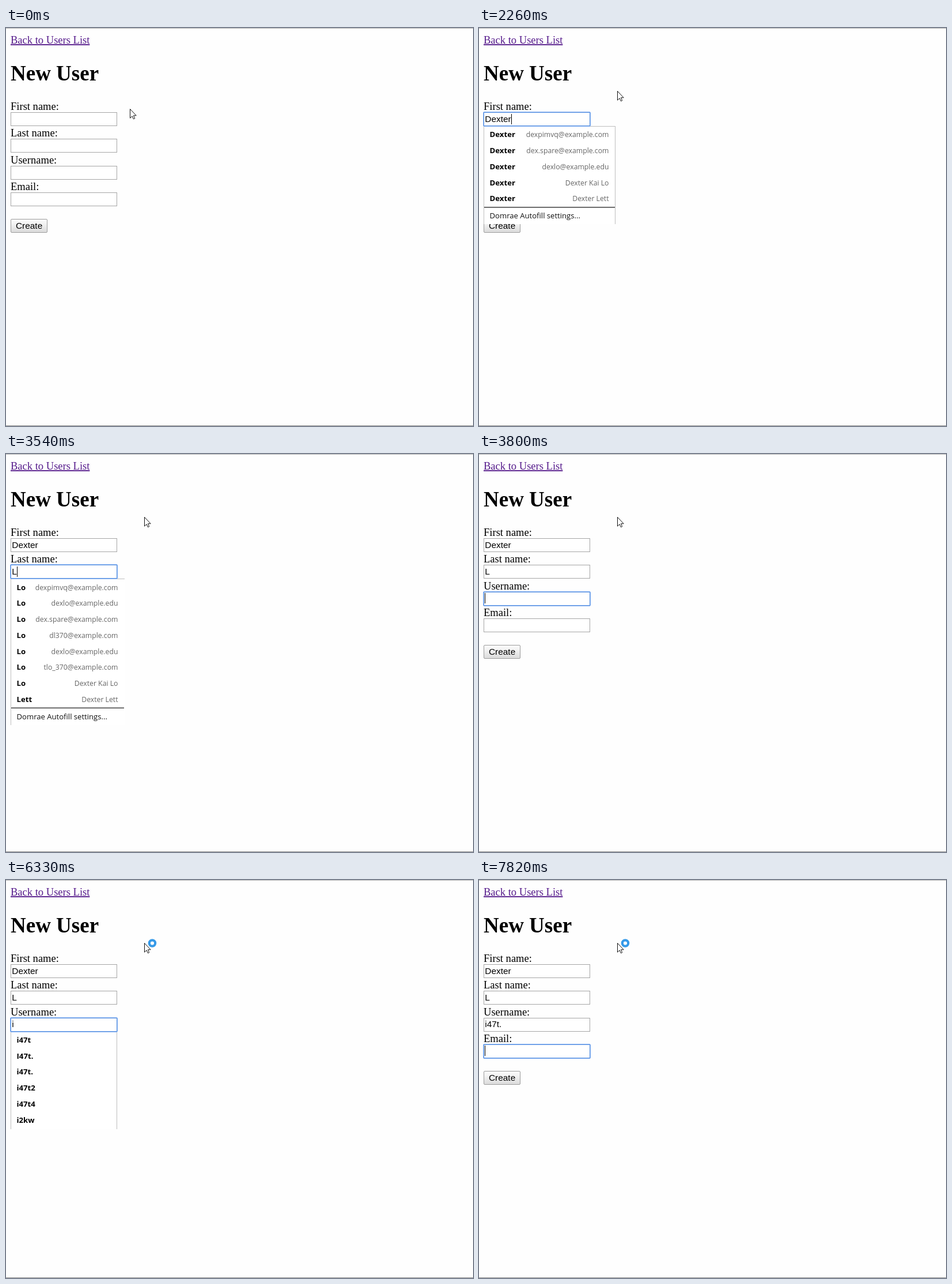
An HTML page for the animation above (8 s loop, 811 by 690 pixels).

```html
<!DOCTYPE html>
<html lang="en">
<head>
<meta charset="utf-8">
<title>New User</title>
<style>
html, body { margin: 0; width: 100%; height: 100%; overflow: hidden; background: #fefefe; }
svg { display: block; position: absolute; left: 0; top: 0; }
text { white-space: pre; }
.serif { font: 18.55px "Liberation Serif", "Times New Roman", serif; }
.link { fill: #551a8b; text-decoration: underline; }
.h1 { font: bold 37px "Liberation Serif", "Times New Roman", serif; }
.input { font: 15.4px "Liberation Sans", Arial, sans-serif; }
.item { font: bold 13.2px "Open Sans", "Noto Sans", sans-serif; }
.note { font: 12.25px "Open Sans", "Noto Sans", sans-serif; fill: #666; }
.more { font: 13.1px "Open Sans", "Noto Sans", sans-serif; fill: #111; }
</style>
</head>
<body>
<svg id="stage" width="811" height="690" viewBox="0 0 811 690">
  <defs>
    <linearGradient id="face" x1="0" y1="0" x2="0" y2="1">
      <stop offset="0" stop-color="#fbfbfb"/>
      <stop offset=".3" stop-color="#f4f4f4"/>
      <stop offset="1" stop-color="#dadada"/>
    </linearGradient>
  </defs>
  <g id="view"></g>
</svg>
<script>
const LOOP = 8000;
const PITCH = 46.25;
const ROW = 27.75;
const LABELS = ["First name:", "Last name:", "Username:", "Email:"];
const TOPS = [146, 192, 239, 285];
const TEXT_X = 10.3;
const FIRST = "Dexter";
const USER = "i47t.";

const pairs = (name, notes) => notes.map(n => [name, n]);
const MAIL = "dexpimvq@example.com", SPARE = "dex.spare@example.com";
const SCHOOL = "dexlo@example.edu", FULL = "Dexter Kai Lo", OTHER = "Dexter Lett";

const userRows = ["i47t", "I47t.", "i47t.", "i47t2", "i47t4"].map(n => [n]);
const popups = {
  first: { field: 0, top: 170, right: 237, bottom: 340, edge: true, line: true, sep: 310,
    rows: pairs(FIRST, [MAIL, SPARE, SCHOOL, FULL, OTHER]) },
  last: { field: 1, top: 216, right: 206, bottom: 470, edge: false, line: true, sep: 439.5,
    rows: [...pairs("Lo", [MAIL, SCHOOL, SPARE, "dl370@example.com", SCHOOL,
      "tlo_370@example.com", FULL]), ["Lett", OTHER]] },
  userAll: { field: 2, top: 262, right: 193, bottom: 432, edge: true, rows: [...userRows, ["i2kw"]] },
  user: { field: 2, top: 262, right: 193, bottom: 404, edge: true, rows: userRows },
  userDot: { field: 2, top: 262, right: 193, bottom: 321, edge: true, rows: userRows.slice(1, 3) }
};

// Each step changes part of the state and holds until the next one.
const steps = [
  [0, { values: ["", "", "", ""], focus: -1, caret: false, popup: "", busy: false, beam: false, x: 215.5, y: 140.5 }],
  [140, { x: 203.5, y: 143.5 }],
  [265, { beam: true, x: 186, y: 147 }],
  [390, { x: 181, y: 147 }],
  [540, { focus: 0, caret: true, x: 176 }],
  [690, { beam: false, x: 240.5, y: 109.5 }],
  [1150, { caret: false }],
  [1580, { caret: true, popup: "first", type: [0, FIRST.slice(0, 2)] }],
  [1840, { type: [0, FIRST.slice(0, 3)] }],
  [1990, { type: [0, FIRST.slice(0, 4)] }],
  [2120, { type: [0, FIRST.slice(0, 5)] }],
  [2260, { type: [0, FIRST] }],
  [2660, { focus: 1, popup: "" }],
  [3120, { caret: false }],
  [3540, { caret: true, popup: "last", type: [1, "L"] }],
  [3680, { popup: "" }],
  [3800, { focus: 2 }],
  [4270, { caret: false }],
  [4840, { caret: true }],
  [5370, { caret: false }],
  [5520, { busy: true }],
  [5800, { caret: true, popup: "userAll", type: [2, USER.slice(0, 1)] }],
  [6330, { caret: false }],
  [6480, { caret: true, popup: "user", type: [2, USER.slice(0, 2)] }],
  [6600, { type: [2, USER.slice(0, 3)] }],
  [6880, { type: [2, USER.slice(0, 4)] }],
  [7430, { type: [2, USER] }],
  [7560, { popup: "userDot" }],
  [7700, { popup: "" }],
  [7820, { focus: 3 }]
];

const ruler = document.createElement("canvas").getContext("2d");
ruler.font = '15.4px "Liberation Sans", Arial, sans-serif';

const text = (cls, x, y, s, anchor = "start") =>
  `<text class="${cls}" x="${x}" y="${y}" text-anchor="${anchor}">${s}</text>`;
const fill = (x, y, w, h, color) =>
  `<rect x="${x}" y="${y}" width="${w}" height="${h}" fill="${color}"/>`;
const box = (x, y, w, h, stroke, paint = "#fff", r = 0) =>
  `<rect x="${x}" y="${y}" width="${w}" height="${h}" rx="${r}" fill="${paint}" stroke="${stroke}"/>`;

function drawPage() {
  return fill(0, 0, 811, 1, "#b4b4b4") + fill(0, 689, 811, 1, "#8c8c8c") +
    text("serif link", 8, 27, "Back to Users List") +
    text("h1", 8, 91, "New User") +
    LABELS.map((s, i) => text("serif", 8, 142 + PITCH * i, s)).join("") +
    TOPS.map(y => box(8.5, y + .5, 184, 23, "#a6a6a6")).join("") +
    box(8.5, 331.5, 63, 23, "#9c9c9c", "url(#face)", 1.5) +
    text("input", 17, 348, "Create");
}

function drawPopup(p) {
  const base = 189.4 + PITCH * p.field;
  const height = p.bottom - p.top;
  let out = fill(8, p.top, p.right - 8, height, "#fff") + fill(8, p.top, 1, height, "#bebebe");
  if (p.edge) out += fill(p.right - 1, p.top, 1, height, "#bebebe");
  if (p.line) out += fill(8, p.top, p.right - 8, 1, "#bebebe");
  p.rows.forEach(([name, note], i) => {
    const y = base + ROW * i;
    out += text("item", 18.5, y, name);
    if (note) out += text("note", p.right - 11.5, y, note, "end");
  });
  if (p.sep) {
    out += fill(9, p.sep, p.right - 10, 1.6, "#4a4a4a") +
      text("more", 18.5, p.sep + 20, "Domrae Autofill settings...");
  }
  return out;
}

function drawFields(s) {
  let out = "";
  if (s.focus >= 0) {
    const y = TOPS[s.focus];
    out += box(7.5, y - .5, 186, 25, "#84b0f2", "none", 1.5) +
      box(8.5, y + .5, 184, 23, "#5e94e0", "none");
  }
  s.values.forEach((v, i) => {
    out += text("input", TEXT_X, 162.6 + PITCH * i, v);
  });
  if (s.caret) {
    const x = Math.round(TEXT_X + ruler.measureText(s.values[s.focus]).width);
    out += fill(x, Math.floor(149 + PITCH * s.focus), 1, 18, "#000");
  }
  return out;
}

function drawPointer(s) {
  const shape = s.beam
    ? '<path d="M1 .5H3L3.5 1L4 .5H6M3.5 1V15M1 15.5H3L3.5 15L4 15.5H6" fill="none" stroke="#000"/>'
    : '<path d="M0 0V15.7L3.6 12.3L5.9 17.3L8.2 16.3L6 11.3H10.7Z" fill="#fff" stroke="#111"/>';
  const x = s.beam ? s.x - 3.5 : s.x;
  const ring = s.busy
    ? '<circle cx="254" cy="109.5" r="5.2" fill="#fff" stroke="#369ae8" stroke-width="4.2"/>' : "";
  return `<g transform="translate(${x} ${s.y})">${shape}</g>` + ring;
}

function stateAt(n) {
  const s = {};
  for (const [, change] of steps.slice(0, n + 1)) {
    Object.assign(s, change);
    if (change.type) {
      s.values = s.values.slice();
      s.values[change.type[0]] = change.type[1];
    }
  }
  return s;
}

const view = document.getElementById("view");
const start = performance.now();
let shown = -1;

function tick() {
  const t = (performance.now() - start) % LOOP;
  const n = steps.filter(([at]) => at <= t).length - 1;
  if (n !== shown) {
    shown = n;
    const s = stateAt(n);
    view.innerHTML = drawPage() + (s.popup ? drawPopup(popups[s.popup]) : "") +
      drawFields(s) + drawPointer(s);
  }
  requestAnimationFrame(tick);
}

tick();
</script>
</body>
</html>
```
